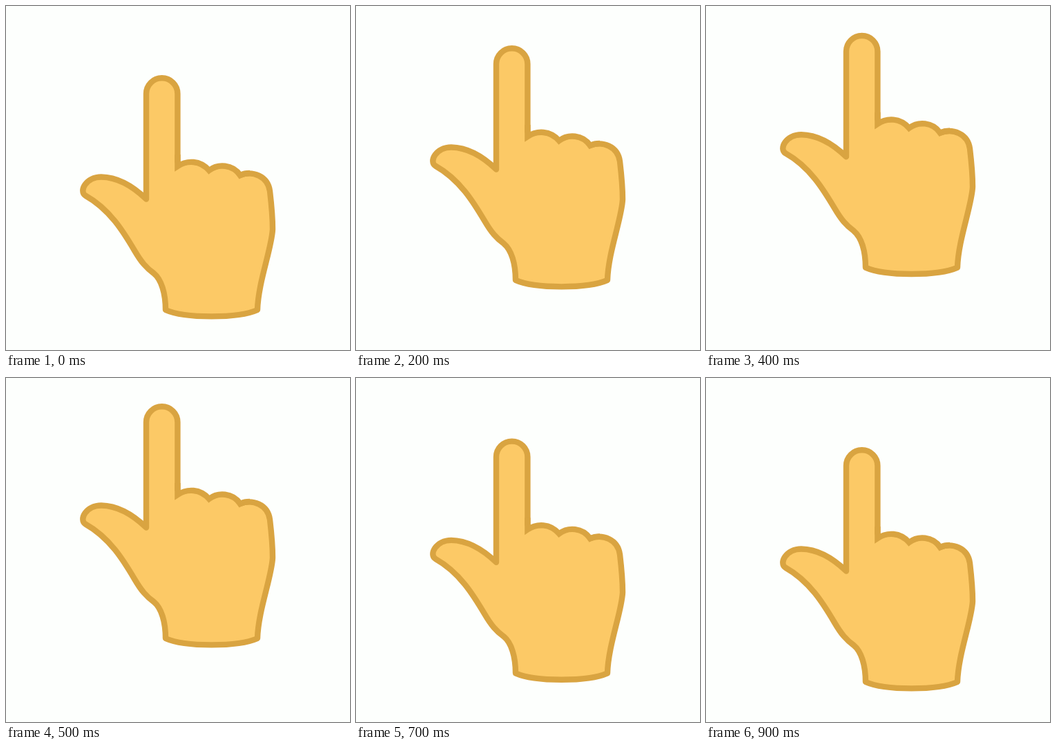
Recreate the animation shown at these times as an HTML page. Size 498 px wide and 498 px high, loop 0.95 s.

```html
<!DOCTYPE html>
<html lang="en">
<head>
<meta charset="utf-8">
<title>Pointing up</title>
<style>
  html, body { margin: 0; width: 100%; height: 100%; overflow: hidden; background: #fdfffd; }
  svg { display: block; width: 100vw; height: 100vh; }
  .fill { fill: #fcc966; }
  .line { fill: none; stroke: #d9a441; stroke-width: 8.4; stroke-linejoin: round; stroke-linecap: round; }
  .knuckles { stroke-linejoin: miter; stroke-linecap: butt; }
</style>
</head>
<body>
<svg viewBox="0 0 498 498">
  <g id="hand">
    <path class="fill" d="M203 279.5V127a22.7 22.7 0 0 1 45.4 0V232C262 223 281 223 294 238C307 228 328 229 339 245C357 238 379 246 382 268C384 285 386 305 386 323C385 350 365 400 364 440C336 452.500 259 452.500 231 440C231 416 225 396 214 387C203 379 196 371 186 354C170 327 150 294 115 274.500C105 268 116 247.500 138 247.500C165 248 188 265 203 279.500Z"/>
    <path class="line" d="M339 245C357 238 379 246 382 268C384 285 386 305 386 323C385 350 365 400 364 440C336 452.500 259 452.500 231 440C231 416 225 396 214 387C203 379 196 371 186 354C170 327 150 294 115 274.500C105 268 116 247.500 138 247.500C165 248 188 265 203 279.500V127a22.7 22.7 0 0 1 45.4 0V225"/>
    <path class="line knuckles" d="M248.400 215V232C262 223 281 223 294 238C307 228 328 229 339 245C343 243 348 242 353 242"/>
  </g>
</svg>
<script>
  const hand = document.getElementById('hand');
  const LOOP = 950, TICK = 50, POWER = 2.25;

  // Height above the resting pose: eased rise, short hold, abrupt eased drop.
  function lift(t) {
    if (t <= 500) return 63 * (1 - Math.pow(1 - t / 500, POWER));
    if (t < 600) return 61;
    return 31.5 * Math.pow((900 - t) / 300, POWER);
  }

  function draw() {
    const t = Math.floor(performance.now() % LOOP / TICK) * TICK;
    hand.setAttribute('transform', `translate(0 ${-lift(t).toFixed(2)})`);
    requestAnimationFrame(draw);
  }
  draw();
</script>
</body>
</html>
```
